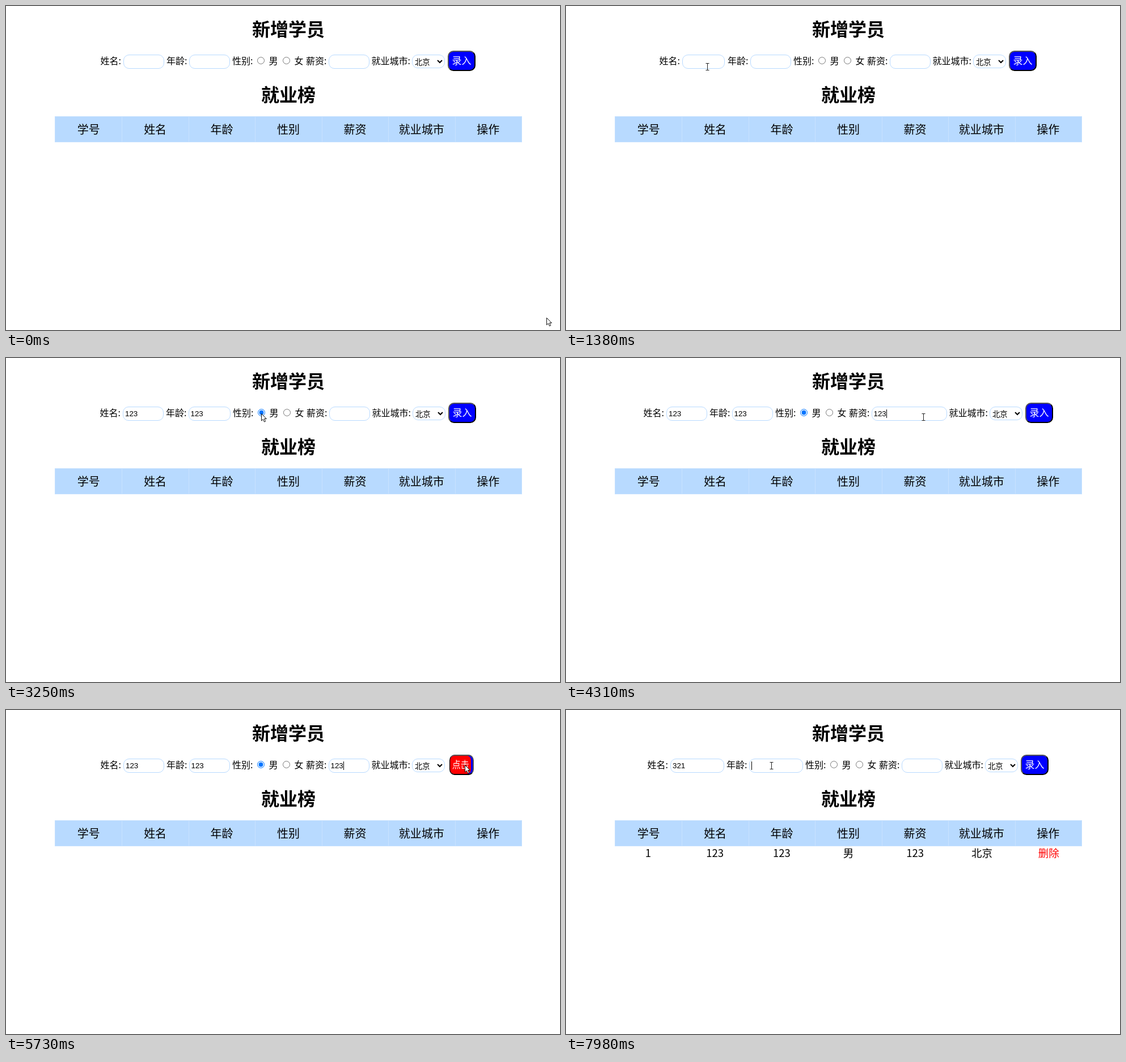
An HTML page that plays this animation: 977x573 px, repeating every 8 s.

```html
<!DOCTYPE html>
<html lang="zh-CN">
<head>
<meta charset="utf-8">
<style>
  html, body { margin: 0; width: 100%; height: 100%; overflow: hidden; background: #fff; }
  body { font: 300 16px/24px "Noto Sans CJK SC", "Noto Sans CJK JP", "Noto Sans CJK", sans-serif; color: #000; }
  #stage { position: relative; width: 977px; height: 573px; overflow: hidden; }
  #stage * { box-sizing: border-box; }
  #stage span, #stage h1, .group, .field, select, #stage input, #button, .face, #cursor { position: absolute; white-space: nowrap; margin: 0; }
  .group { top: 0; left: 0; }
  .group > span { top: 84px; }
  h1 { left: 0; width: 996px; font-size: 32px; line-height: 48px; text-align: center; font-weight: 700; }
  .field, select { border: 1px solid #b8daff; border-radius: 10px; background: #fff; color: #000; }
  .field { top: 86px; height: 25px; padding-left: 3px; font: 13.333px/23px "Liberation Sans", sans-serif; }
  .field i { display: inline-block; width: 1px; height: 15px; margin-right: -1px; background: #000; vertical-align: -3px; }
  select { left: 716px; top: 86px; width: 58px; height: 24px; font: 300 13.333px "Noto Sans CJK SC", "Noto Sans CJK JP", sans-serif; pointer-events: none; }
  #stage input { width: 13px; height: 13px; top: 90px; pointer-events: none; }
  #button { left: 779px; top: 79px; width: 49px; height: 36px; transform-style: preserve-3d; }
  .face { inset: 0; border-radius: 10px; color: #fff; font-size: 17px; line-height: 30px; text-align: center; }
  .front { background: #00f; border: 2px outset #000; }
  .back { inset: 2px 2px 2px 5px; border-radius: 8px; background: red; transform: translateZ(-1px) rotateY(180deg); }
  .row { position: absolute; left: 86px; width: 824px; display: grid; grid-template-columns: repeat(7, 1fr); text-align: center; }
  #head { top: 195px; height: 46px; background: #b8daff; border: 1px solid #c4e0ff; font-size: 20px; line-height: 44px; }
  #head div + div { box-shadow: inset 1px 0 #c9e2ff; }
  #record { top: 240px; font-size: 18.5px; line-height: 24px; }
  #record div:last-child { color: red; }
  #cursor { left: 0; top: 0; overflow: visible; }
</style>
</head>
<body>
<div id="stage">
  <h1 style="top:15px">新增学员</h1>
  <div class="group"><span style="left:166.5px">姓名:</span><div class="field" style="left:207px"></div></div>
  <div class="group"><span style="left:283px">年龄:</span><div class="field" style="left:322.5px"></div></div>
  <div class="group">
    <span style="left:399px">性别:</span>
    <input type="radio" id="male" style="left:443px"><span style="left:463.5px">男</span>
    <input type="radio" style="left:488px"><span style="left:508.5px">女</span>
    <span style="left:529px">薪资:</span><div class="field" style="left:568.5px"></div>
  </div>
  <div class="group">
    <span style="left:644.5px">就业城市:</span>
    <select tabindex="-1"><option>北京</option></select>
    <div id="button"><div class="face front">录入</div><div class="face back">点击</div></div>
  </div>
  <h1 style="top:131px">就业榜</h1>
  <div class="row" id="head"></div>
  <div class="row" id="record"></div>
  <svg id="cursor" width="1" height="1">
    <path id="arrow" d="M.5 .5V13L3.4 10.3 5.5 15 7.6 14 5.6 9.5H9.3Z" fill="#fff" stroke="#111"/>
    <path id="beam" d="M-2.5 -5.5H3.5M.5 -5.5V6.5M-2.5 6.5H3.5" fill="none" stroke="#222"/>
  </svg>
</div>
<script>
const $ = id => document.getElementById(id);
const LOOP = 8000, GROW = 61, BASE = 72, PICK = 3250, SUBMIT = 6080;
const KEY_GAP = 120, BLINK = 1060;

const addCells = (row, words) => words.split(' ').forEach(word =>
  row.appendChild(document.createElement('div')).textContent = word);
addCells($('head'), '学号 姓名 年龄 性别 薪资 就业城市 操作');
addCells($('record'), '1 123 123 男 123 北京 删除');

// Spans of time: hover widens a field, focus shows its caret.
const fields = [
  { hover: [[1345, 1940], [7100, 7800]], focus: [[1450, 2200], [7250, 7920]],
    entries: [{ text: '123', from: 1500, to: SUBMIT }, { text: '321', from: 7350, to: LOOP }] },
  { hover: [[2120, 2880], [6890, 7010], [7860, LOOP]], focus: [[2200, PICK], [7920, LOOP]],
    entries: [{ text: '123', from: 2420, to: SUBMIT }] },
  { hover: [[750, 830], [3550, 4500]], focus: [[3700, SUBMIT]],
    entries: [{ text: '123', from: 3960, to: SUBMIT }] }
];
const buttonHover = [[5190, 6690]];

const groups = [...document.querySelectorAll('.group')];
document.querySelectorAll('.field').forEach((box, i) => {
  fields[i].box = box;
  fields[i].value = box.appendChild(document.createTextNode(''));
  fields[i].caret = box.appendChild(document.createElement('i'));
});

// Pointer moves: depart, arrive, x, y
const moves = [
  [70, 760, 605, 108], [820, 1050, 420, 160], [1050, 1380, 249, 107], [1860, 2250, 348, 98],
  [2800, 3080, 450, 98], [3350, 3700, 630, 104], [4400, 5330, 809, 97],
  [6660, 6970, 358, 107], [6970, 7200, 240, 98], [7740, 7930, 362, 98]
];

const clamp = x => Math.min(1, Math.max(0, x));
const smooth = x => x * x * (3 - 2 * x);
const inside = (spans, t) => spans.find(([a, b]) => t >= a && t < b);

// CSS "ease": cubic-bezier(.25, .1, .25, 1)
function ease(x) {
  if (x <= 0 || x >= 1) return clamp(x);
  const bezier = (p, q, s) => 3 * p * s * (1 - s) ** 2 + 3 * q * s * s * (1 - s) + s ** 3;
  let low = 0, high = 1;
  for (let i = 0; i < 20; i++) {
    const mid = (low + high) / 2;
    if (bezier(.25, .25, mid) < x) low = mid; else high = mid;
  }
  return bezier(.1, 1, low);
}

// A transition that reverses when the hover ends.
function hoverAmount(spans, duration, t) {
  return spans.reduce((sum, [start, end]) => {
    if (t <= start) return sum;
    const reached = ease((Math.min(t, end) - start) / duration);
    return sum + (t > end ? reached * (1 - ease((t - end) / (duration * reached))) : reached);
  }, 0);
}

function pointerAt(t) {
  return moves.reduce(([px, py], [depart, arrive, x, y]) => {
    const k = smooth(clamp((t - depart) / (arrive - depart)));
    return [px + (x - px) * k, py + (y - py) * k];
  }, [953, 551]);
}

function drawField(field, extra, t) {
  const entry = field.entries.find(e => t >= e.from && t < e.to);
  const count = entry ? Math.min(entry.text.length, 1 + Math.floor((t - entry.from) / KEY_GAP)) : 0;
  const lastKey = entry ? entry.from + (count - 1) * KEY_GAP : 0;
  const focus = inside(field.focus, t);
  const lit = focus && (t - Math.max(focus[0], lastKey)) % BLINK < BLINK / 2;
  field.box.style.width = BASE + extra + 'px';
  field.value.data = entry ? entry.text.slice(0, count) : '';
  field.caret.style.visibility = lit ? 'visible' : 'hidden';
}

function draw(t) {
  const extras = fields.map(f => GROW * hoverAmount(f.hover, 500, t));
  let shift = -extras.reduce((a, b) => a + b) / 2;
  groups.forEach((group, i) => {
    group.style.left = Math.round(shift) + 'px';
    shift += extras[i] || 0;
  });
  fields.forEach((field, i) => drawField(field, extras[i], t));

  $('male').checked = t >= PICK && t < SUBMIT;
  $('record').style.visibility = t >= SUBMIT ? 'visible' : 'hidden';
  $('button').style.transform = `rotateY(${180 * hoverAmount(buttonHover, 1000, t)}deg)`;

  const [x, y] = pointerAt(t).map(Math.round);
  const typing = fields.some(f => inside(f.hover, t));
  $('cursor').style.transform = `translate(${x}px, ${y}px)`;
  $('arrow').style.display = typing ? 'none' : '';
  $('beam').style.display = typing ? '' : 'none';
}

const began = performance.now();
function tick() {
  draw((performance.now() - began) % LOOP);
  requestAnimationFrame(tick);
}
tick();
</script>
</body>
</html>
```
